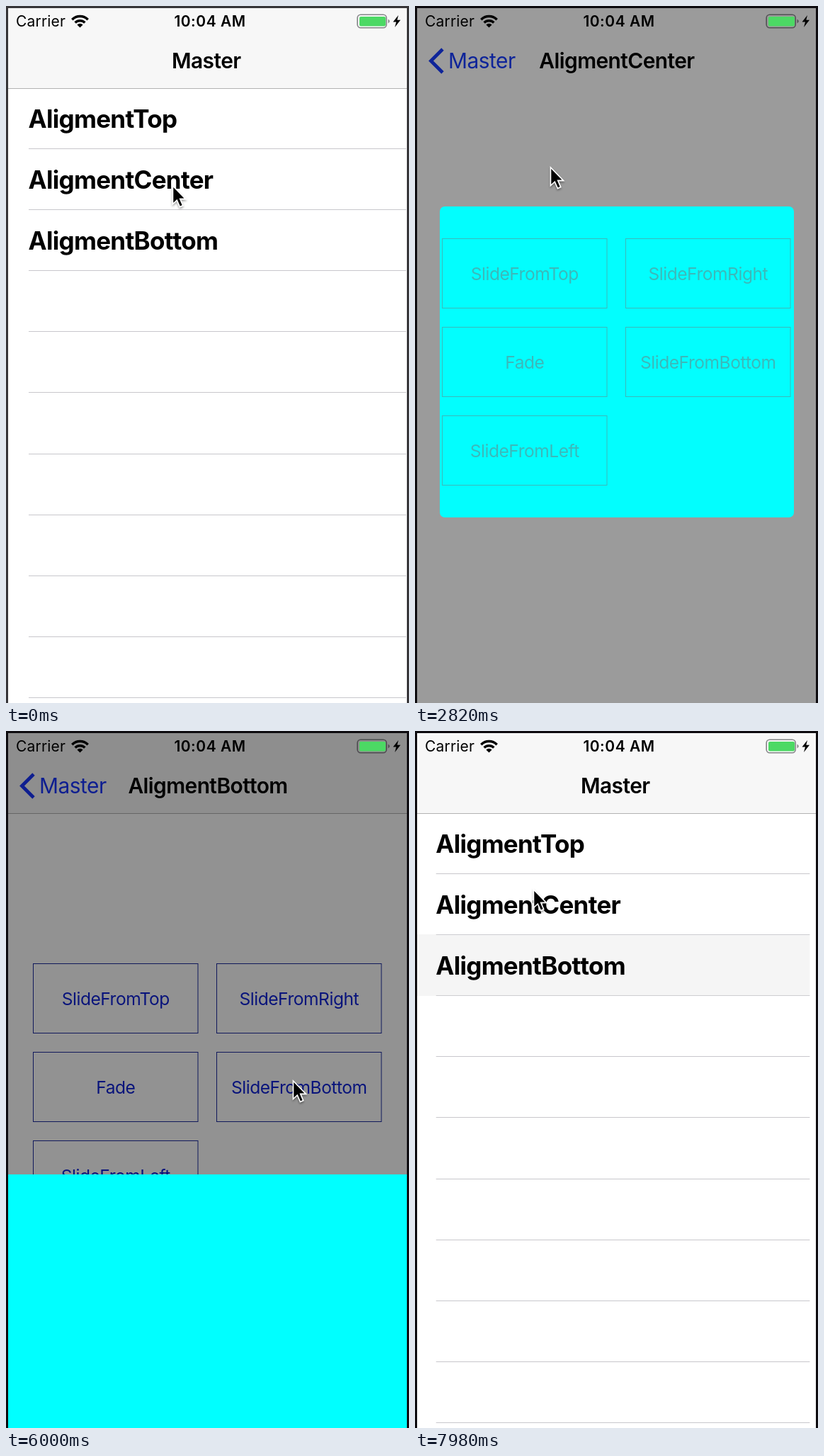
An HTML page that plays this animation: 569 by 984 pixels, repeating every 8000 ms.

```html
<!DOCTYPE html>
<html lang="en">
<head>
<meta charset="utf-8">
<title>Popup alignment demo</title>
<style>
  html, body { margin: 0; height: 100%; overflow: hidden; background: #fff; }
  svg { display: block; width: 100vw; height: 100vh; }
  text { font-family: Inter, "Open Sans", sans-serif; stroke: none; white-space: pre; }
  .title { font-size: 29.9px; font-weight: 600; letter-spacing: -.019em; }
  .back { font-size: 29.9px; letter-spacing: -.017em; }
  .row { font-size: 35px; font-weight: 700; letter-spacing: -.02em; }
  .button { font-size: 24.6px; letter-spacing: -.02em; text-anchor: middle; }
  .status { font-size: 21px; letter-spacing: .01em; }
  .clock { font-weight: 600; letter-spacing: .024em; }
</style>
</head>
<body>
<svg viewBox="0 0 569 984" preserveAspectRatio="none">
  <defs>
    <g id="buttons"></g>
    <linearGradient id="shade">
      <stop offset="0" stop-opacity="0"/>
      <stop offset="1" stop-opacity=".1"/>
    </linearGradient>
    <filter id="soft" x="-50%" y="-50%" width="200%" height="200%">
      <feDropShadow dx="0" dy="2" stdDeviation="1.5" flood-opacity=".4"/>
    </filter>
  </defs>
  <rect width="569" height="984" fill="#fff"/>

  <g id="master"></g>
  <rect id="masterShade" x="3" y="117" width="563" height="867"/>

  <g id="page">
    <rect id="pageShadow" x="-5" y="117" width="8" height="867" fill="url(#shade)"/>
    <rect x="3" y="117" width="563" height="867" fill="#fff"/>
    <use href="#buttons" fill="#0f22d6" stroke="#1b2a9e"/>
  </g>

  <g id="bar">
    <rect x="3" y="3" width="563" height="113" fill="#f7f7f7"/>
    <rect x="3" y="116" width="563" height="1" fill="#b2b2b2"/>
  </g>
  <g id="back" fill="none">
    <path d="M39 61 22.5 77.5 39 94" stroke="currentColor" stroke-width="4.8"/>
    <text id="backLabel" class="back" y="88" fill="currentColor">Master</text>
  </g>
  <text id="masterTitle" class="title" y="88">Master</text>
  <text id="pageTitle" class="title" y="88" text-anchor="middle"></text>

  <text class="status" x="14" y="29">Carrier</text>
  <text class="status clock" x="288" y="29" text-anchor="middle">10:04 AM</text>
  <g fill="none" stroke="#000" stroke-width="3.5">
    <path d="M93.3 19.2A15.8 15.8 0 0 1 115.7 19.2"/>
    <path d="M97.6 23.5A9.8 9.8 0 0 1 111.4 23.5"/>
    <path d="M104.5 30.5 100.4 26.4A5.8 5.8 0 0 1 108.6 26.4Z" fill="#000" stroke="none"/>
  </g>
  <g fill="#858588">
    <rect x="496.2" y="12.2" width="41" height="18.6" rx="4.5" fill="none" stroke="#858588" stroke-width="1.6"/>
    <path d="M539.5 18.5Q544 21.5 539.5 24.5Z"/>
  </g>
  <path d="M554 13 546.5 22.5H551L549 30 557 19.8H552.3Z"/>

  <rect id="dim" x="3" y="3" width="563" height="981"/>
  <rect x="499" y="15" width="37" height="13.5" rx="2" fill="#4cd964"/>
  <rect id="centerPopup" x="35" y="283" width="500" height="439" rx="7" fill="#0ff"/>
  <use id="ghost" href="#buttons" fill="#777" stroke="#777"/>
  <rect id="bottomPopup" x="3" width="563" height="441" fill="#0ff"/>

  <path id="frame" d="M0 0H569V984H566V3H3V984H0Z"/>
  <path id="cursor" d="M0 0V25.5L5.8 20 10 29.5 14.2 27.6 10.2 18.4H18Z"
        stroke="#fff" stroke-width="1.6" filter="url(#soft)"/>
</svg>

<script>
const LOOP = 8000, STEP = 60, WIDTH = 562, ROW_HEIGHT = 86.1;
const rowNames = ["AligmentTop", "AligmentCenter", "AligmentBottom"];
const buttonNames = ["SlideFromTop", "SlideFromRight", "Fade", "SlideFromBottom", "SlideFromLeft"];
const visits = [
  { row: 1, push: 500, pop: 3563 },
  { row: 2, push: 4640, pop: 7587 },
];
// Each cursor move: start, end, destination
const cursorStart = [235, 253];
const cursorMoves = [
  [1100, 1560, 150, 505],
  [2000, 2540, 191, 227],
  [2860, 3480, 62, 86],
  [3700, 4540, 232, 342],
  [4940, 5400, 405, 493],
  [6320, 6640, 300, 210],
  [6900, 7480, 62, 86],
  [7660, 7980, 167, 223],
];

const $ = id => document.getElementById(id);
const set = (id, attrs) => {
  for (const name in attrs) $(id).setAttribute(name, attrs[name]);
};
const mix = (a, b, k) => a + (b - a) * k;
const clamp = x => Math.min(1, Math.max(0, x));
const smooth = x => (x = clamp(x), x * x * (3 - 2 * x));
// Critically damped spring used by the navigation transitions
const spring = ms => {
  const x = Math.max(0, ms) * 0.016;
  return 1 - (1 + x) * Math.exp(-x);
};

$("buttons").innerHTML = buttonNames.map((name, i) => {
  const x = 38.5 + 259 * (i % 2), y = 328.5 + 125 * Math.floor(i / 2);
  return `<rect x="${x}" y="${y}" width="232.5" height="98" fill="none"/>
    <text class="button" x="${x + 116.3}" y="${y + 58.7}">${name}</text>`;
}).join("");

$("master").innerHTML =
  Array.from({ length: 10 }, (_, i) =>
    `<rect x="32" y="${Math.round(201 + ROW_HEIGHT * i)}" width="800" height="1" fill="#c8c7cc"/>`).join("") +
  `<rect id="selection" x="3" width="800" height="87" fill="#d9d9d9"/>` +
  rowNames.map((name, i) =>
    `<text id="row${i}" class="row" x="31.5" y="${172 + ROW_HEIGHT * i}">${name}</text>`).join("");

// Returns how far the titles have moved towards the master screen
function drawNavigation(t) {
  const { row, push, pop } = visits[t < 4300 ? 0 : 1];
  const popped = spring(t - pop);
  const cover = spring(t - push) - popped;
  const reveal = t > pop ? clamp(1.02 * popped ** 1.18) : 1 - cover;
  const selected = t >= push - 20 ? 1 - smooth((t - pop) / 600) : 0;

  set("master", { transform: `translate(${-0.3 * WIDTH * cover})` });
  set("masterShade", { opacity: 0.14 * cover });
  set("selection", { y: Math.round(115 + ROW_HEIGHT * row), opacity: selected });
  rowNames.forEach((_, i) =>
    set("row" + i, { fill: i === row && selected > 0.6 ? "#fff" : "#000" }));

  set("page", { transform: `translate(${WIDTH * (1 - cover)})` });
  set("pageShadow", { opacity: cover });

  const labelX = 47 + 187 * reveal;
  set("back", { opacity: clamp(1 - 1.8 * reveal) });
  set("backLabel", { x: labelX });
  set("masterTitle", { x: labelX, opacity: reveal });
  set("pageTitle", { x: 285 + 352 * reveal, opacity: 1 - reveal ** 1.2 });
  $("pageTitle").textContent = rowNames[row];
  return reveal;
}

// Returns how much the screen is dimmed by a popup
function drawPopups(t) {
  const fade = smooth((t - 1640) / 400) - smooth((t - 2700) / 400);
  const slide = smooth((t - 5620) / 500) - smooth((t - 6680) / 420);
  const shown = Math.max(fade, slide);

  set("dim", { opacity: shown / 2 });
  set("bar", { opacity: 1 - clamp(3 * fade) });
  set("centerPopup", { opacity: 1 - (1 - fade) ** 3 });
  set("ghost", { opacity: clamp(2.3 * (1 - fade)) * fade * 1.28 });
  set("bottomPopup", { y: mix(1003, 562, slide) });
  return shown;
}

function drawCursor(t) {
  let [x, y] = cursorStart;
  for (const [start, end, toX, toY] of cursorMoves) {
    const k = smooth((t - start) / (end - start));
    x = mix(x, toX, k);
    y = mix(y, toY, k);
  }
  set("cursor", { transform: `translate(${x + 0.5} ${y + 1})` });
}

function render() {
  const t = Math.floor(performance.now() % LOOP / STEP) * STEP;
  const reveal = drawNavigation(t);
  const shown = drawPopups(t);
  const tint = clamp(shown + 2 * reveal);
  set("back", { color: `rgb(${mix(21, 24, tint)},${mix(126, 40, tint)},251)` });
  drawCursor(t);
  set("frame", { fill: t < 480 ? "#373639" : "#0e0c10" });
  requestAnimationFrame(render);
}
render();
</script>
</body>
</html>
```
